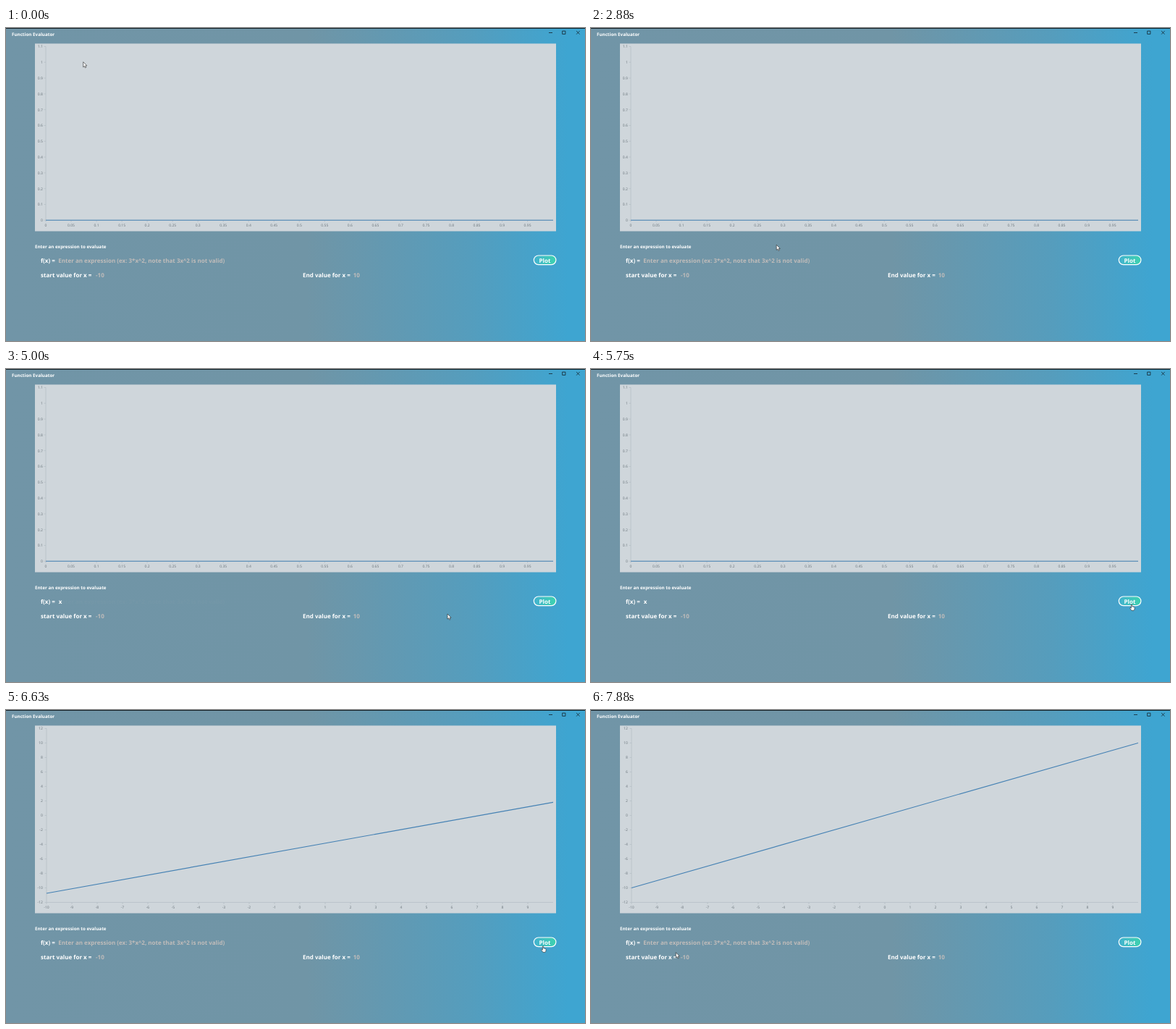
Recreate the animation shown at these times as an HTML page. Size 800 by 432 pixels, loop 8000 ms.

```html
<!DOCTYPE html>
<html lang="en">
<head>
<meta charset="utf-8">
<title>Function Evaluator</title>
<style>
  html, body { margin: 0; width: 100%; height: 100%; overflow: hidden; }
  svg { display: block; width: 100vw; height: 100vh; text-rendering: geometricPrecision; }
  text { font: 700 8px "Open Sans", "Noto Sans", sans-serif; fill: #fff; white-space: pre; }
  .small { font-size: 6.25px; }
  .prompt { fill: #c0bcba; }
  .axis text { font-size: 5px; font-weight: 400; fill: #69737a; }
  .axis path { fill: none; stroke: #b3bdc4; stroke-width: .7; }
</style>
</head>
<body>
<svg viewBox="0 0 800 432">
  <defs>
    <linearGradient id="sky">
      <stop offset="0" stop-color="#7195a7"/>
      <stop offset=".52" stop-color="#7095a6"/>
      <stop offset=".8" stop-color="#559dbd"/>
      <stop offset=".97" stop-color="#3ea5d1"/>
    </linearGradient>
    <linearGradient id="mint">
      <stop offset="0" stop-color="#43b2d0"/>
      <stop offset="1" stop-color="#3dd2ae"/>
    </linearGradient>
  </defs>
  <rect width="800" height="432" fill="url(#sky)"/>
  <rect width="800" height=".9" fill="#0b1216"/>
  <text class="small" x="8" y="11.3">Function Evaluator</text>
  <path d="M750 6.5h5M768.7 4.2h4.2v4.2h-4.2zM788.2 4.2l4.4 4.4m0-4.4l-4.4 4.4" fill="none" stroke="#15232b" stroke-width=".8"/>

  <rect x="40" y="21.5" width="720" height="259" fill="#cfd6db"/>
  <g class="axis" id="emptyAxes"></g>
  <g class="axis" id="plotAxes"></g>
  <path id="curve" fill="none" stroke="#4682b4" stroke-width="1.1"/>

  <text class="small" x="40" y="304.2">Enter an expression to evaluate</text>
  <text x="48" y="323.8">f(x) =</text>
  <text id="hint" class="prompt" x="72.3" y="323.8">Enter an expression (ex: 3*x^2, note that 3x^2 is not valid)</text>
  <text id="typed" x="72.8" y="323.8">x</text>
  <path id="caret" d="M78.4 317v8" stroke="#58b4de" stroke-width=".8"/>
  <text x="48" y="343.8">start value for x =</text>
  <text class="prompt" x="124" y="343.8">-10</text>
  <text x="410" y="343.8">End value for x =</text>
  <text class="prompt" x="479.7" y="343.8">10</text>
  <rect x="729.3" y="314" width="30.6" height="12.6" rx="6.3" fill="url(#mint)" stroke="#fff" stroke-width="1.2"/>
  <text x="744.5" y="323.6" text-anchor="middle">Plot</text>

  <g id="arrow"><path d="M0 0v7.2l1.6-1.5 1.1 2.5 1.3-.6-1.1-2.4h2.2z" fill="#fff" stroke="#222" stroke-width=".6"/></g>
  <g id="beam"><path d="M-1.5-3.2q1.5 0 1.5.8 0-.8 1.5-.8M0-2.6v5.2M-1.5 3.2q1.5 0 1.5-.8 0 .8 1.5.8" fill="none" stroke="#1d2930" stroke-width=".8"/></g>
  <g id="hand"><path d="M-1.6-4q.8-.6 1.3.2v2.6l2.6.6q1 .3.9 1.4l-.5 2.6-.6.9h-3.2l-2.2-3q-.1-1 .9-.8l.8.7z" fill="#fff" stroke="#222" stroke-width=".6"/></g>
</svg>
<script>
const LOOP = 8000, STEP = 125;
const TYPED_AT = 4000, PLOTTED_AT = 6125, RISE_AT = 6245, RISE_TIME = 1736;
const $ = id => document.getElementById(id);
const show = (id, visible) => $(id).style.display = visible ? "" : "none";

// Each axis: number of labels, pixel spacing and the value at an index.
function drawAxes(id, left, bottom, xAxis, yAxis) {
  let ticks = `M${left} 25.5V${bottom}H756`, labels = "";
  for (let i = 0; i < xAxis.count; i++) {
    const x = left + i * xAxis.gap;
    ticks += `M${x} ${bottom}v2.5`;
    labels += `<text x="${x}" y="274" text-anchor="middle">${xAxis.value(i)}</text>`;
  }
  for (let i = 0; i < yAxis.count; i++) {
    const y = bottom - i * yAxis.gap;
    ticks += `M${left} ${y}h-2.5`;
    labels += `<text x="50.8" y="${y + 1.9}" text-anchor="end">${yAxis.value(i)}</text>`;
  }
  $(id).innerHTML = `<path d="${ticks}"/>${labels}`;
}
drawAxes("emptyAxes", 55, 265.3,
  { count: 20, gap: 35.03, value: i => i * 5 / 100 },
  { count: 12, gap: 21.8, value: i => i / 10 });
drawAxes("plotAxes", 56, 265.5,
  { count: 20, gap: 35, value: i => i - 10 },
  { count: 13, gap: 20, value: i => 2 * i - 12 });

// Pointer path: time, x, y, shape until the next point.
const pointer = [
  [0, 106.7, 46.8, "arrow"], [500, 106.7, 46.8, "arrow"], [1250, 592, 10, "arrow"],
  [1625, 592, 10, "arrow"], [1750, 595.7, 7.2, "arrow"], [2500, 335, 243, "arrow"],
  [3000, 230, 318, "beam"], [3375, 196, 327, "beam"], [4250, 196, 327, "beam"],
  [4500, 360, 329, "beam"], [5000, 610, 338, "arrow"], [5375, 748, 330, "hand"],
  [5750, 748, 329, "hand"], [6625, 743, 330, "hand"], [6750, 722, 338, "beam"],
  [7125, 627.7, 353, "beam"], [7500, 330, 346, "arrow"], [7875, 117.3, 334.7, "arrow"],
  [LOOP, 117.3, 334.7, "arrow"]
];

function drawPointer(t) {
  const i = pointer.findIndex((p, k) => t < pointer[k + 1][0]);
  const [t0, x0, y0, shape] = pointer[i], [t1, x1, y1] = pointer[i + 1];
  const k = (t - t0) / (t1 - t0);
  for (const id of ["arrow", "beam", "hand"]) show(id, id === shape);
  $(shape).setAttribute("transform", `translate(${x0 + (x1 - x0) * k} ${y0 + (y1 - y0) * k})`);
}

function draw(t) {
  const plotted = t >= PLOTTED_AT, typed = t >= TYPED_AT && !plotted;
  show("emptyAxes", !plotted);
  show("plotAxes", plotted);
  show("typed", typed);
  show("caret", typed && t < 4500);
  $("hint").style.opacity = typed ? Math.max(0, .13 * (1 - (t - TYPED_AT) / 1500)) : 1;

  const p = Math.min(1, Math.max(0, (t - RISE_AT) / RISE_TIME));
  const rise = 1 - (1 - p) ** 4;
  $("curve").setAttribute("d", plotted
    ? `M56 ${265.5 - 20 * rise}L756 ${265.5 - 220 * rise}`
    : "M55 265.3H756");
  drawPointer(t);
}

function tick() {
  const t = performance.now() % LOOP;
  draw(Math.floor((t + 1) / STEP) * STEP % LOOP);
  requestAnimationFrame(tick);
}
tick();
</script>
</body>
</html>
```
